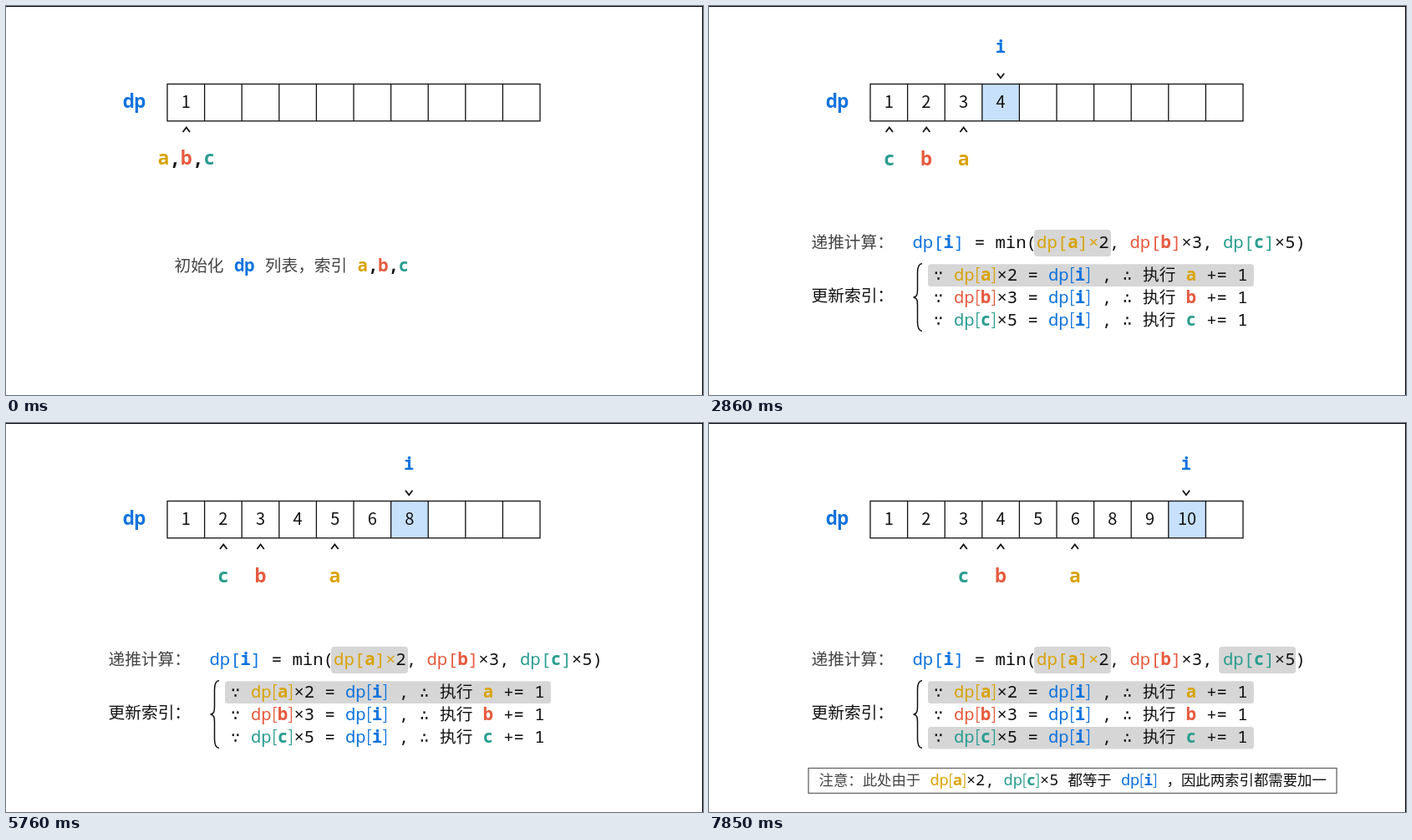
Animation of 834x466 px, one loop 8000 ms. Source, as an HTML page:

```html
<!DOCTYPE html>
<html lang="zh-CN">
<head>
<meta charset="utf-8">
<title>dp</title>
<style>
  html, body { margin: 0; width: 100%; height: 100%; overflow: hidden; background: #fff; }
  svg { display: block; width: 834px; height: 466px; }
  text { white-space: pre; font-family: "Noto Sans Mono", "DejaVu Sans Mono", monospace; fill: #111; }
  .cjk, .num { font-family: "Noto Sans CJK SC", "Noto Sans CJK", "Noto Sans", sans-serif; }
  .sym { font-family: "DejaVu Sans Mono", monospace; text-anchor: middle; }
  .mid { text-anchor: middle; }
  .bold { font-weight: 700; }
  .i { fill: #0f73dd; }
  .a { fill: #d9a306; }
  .b { fill: #e65a3e; }
  .c { fill: #2a9d8f; }
  .grey { fill: #444; }
  .mark { fill: #d6d6d6; }
  .line { fill: none; stroke: #111; stroke-width: 1.3; }
  .caret { fill: none; stroke: #111; stroke-width: 1.8; }
  .brace { fill: none; stroke: #111; stroke-width: 1.5; }
</style>
</head>
<body>
<svg viewBox="0 0 834 466" id="stage"></svg>
<script>
const DURATION = 8000;
const STARTS = [0, 810, 1770, 2780, 3740, 4750, 5760, 6770, 7730];
const FACTORS = { a: 2, b: 3, c: 5 };
const KEYS = ['a', 'b', 'c'];
const CELL = 44.6, LEFT = 193, TOP = 93.5, HEIGHT = 44.3, ROW = 27.1;
const TEXT = { mono: 20.5, cjk: 19.7, bracket: 7.3 };
const FORMULA = { mono: 20.64, cjk: 19.7, bracket: 12.38 };
const NOTE = { mono: 18.6, cjk: 17.4, bracket: 5 };
const LABEL = { mono: 22.9, cjk: 22.9, bracket: 13.7 };

const center = n => LEFT + CELL * (n + .5);
const pointer = n => 215.8 + 44.4 * n;
const rect = (x, y, w, h, attrs) =>
  `<rect x="${x}" y="${y}" width="${w}" height="${h}" ${attrs}/>`;
const text = (x, y, size, cls, s) =>
  `<text x="${x.toFixed(2)}" y="${y}" font-size="${size}" class="${cls}">${s}</text>`;
const ref = key => [['dp[', key], [key, key + ' bold'], [']', key]];

// Lays out [text, class] parts, mixing fixed-pitch, full-width and bracket advances.
function run(x, y, style, parts) {
  const advance = style.mono * .6;
  const kinds = /[\u3000-\u9fff\uff00-\uffef]+|[∵∴]|[\[\]]|[^\u3000-\u9fff\uff00-\uffef∵∴\[\]]+/g;
  let out = '';
  for (const [content, cls = ''] of parts) {
    for (const s of content.match(kinds)) {
      if (/[\u3000-\u9fff\uff00-\uffef]/.test(s)) {
        out += text(x, y, style.cjk, cls + ' cjk', s);
        x += s.length * style.cjk;
      } else if (/[∵∴]/.test(s)) {
        out += text(x + advance / 2, y, style.mono * .9, 'sym', s);
        x += advance;
      } else if (/[\[\]]/.test(s)) {
        const narrow = style.bracket < advance * .8;
        out += narrow
          ? text(x + style.bracket / 2, y, style.cjk, cls + ' cjk mid', s)
          : text(x, y, style.mono, cls, s);
        x += style.bracket;
      } else {
        out += text(x, y, style.mono, cls, s);
        x += s.length * advance;
      }
    }
  }
  return out;
}

const commaList = keys =>
  keys.flatMap((k, n) => n ? [[',', 'bold'], [k, k + ' bold']] : [[k, k + ' bold']]);

function caret(x, base, tip) {
  return `<path class="caret" d="M${x - 4.2} ${base}L${x} ${tip}L${x + 4.2} ${base}"/>`;
}

function board(dp, index, current) {
  let out = text(139.8, 122, 22.9, 'i bold', 'dp');
  if (current) {
    const x = pointer(current);
    out += rect(LEFT + CELL * current, TOP, CELL, HEIGHT, 'fill="#c7e0fc"');
    out += text(x, 55.5, 20.5, 'i bold mid', 'i') + caret(x, 80.7, 86.2);
  }
  out += rect(LEFT, TOP, CELL * 10, HEIGHT, 'class="line"');
  for (let n = 1; n < 10; n++) {
    out += `<path class="line" d="M${LEFT + CELL * n} ${TOP}v${HEIGHT}"/>`;
  }
  dp.forEach((v, n) => out += text(center(n), 122, 20, 'num mid', v));
  for (const n of new Set(Object.values(index))) {
    const keys = KEYS.filter(k => index[k] === n);
    const width = (keys.length * 2 - 1) * LABEL.mono * .6;
    out += caret(pointer(n), 151, 145.5);
    out += run(pointer(n) - width / 2, current ? 190.5 : 190, LABEL, commaList(keys));
  }
  return out;
}

function intro() {
  return run(201.5, 318, TEXT, [
    ['初始化', 'grey'], [' '], ['dp', 'i bold'], [' '], ['列表，索引', 'grey'], [' '],
    ...commaList(KEYS)
  ]);
}

function rules(hits) {
  let out = '';
  KEYS.forEach((k, n) => {
    if (!hits.includes(k)) return;
    out += rect(389 + 110.6 * n, 268, 92, 32, 'rx="4" class="mark"');
    out += rect(262, 309.3 + 27.3 * n, 390, 26.6, 'rx="3.5" class="mark"');
  });
  out += run(122.5, 290, TEXT, [['递推计算：', 'grey']]);
  out += run(122.6, 354, TEXT, [['更新索引：']]);
  out += run(243.4, 290, FORMULA, [
    ...ref('i'), [' = min('],
    ...ref('a'), ['×', 'a'], ['2, '],
    ...ref('b'), ['×3, '],
    ...ref('c'), ['×5)']
  ]);
  out += '<path class="brace" d="M255 308.5c-4.5 .5-5.5 5-5.5 11v20.5c0 6-1 8.5-5 9 4 .5 5 3 5 9v20.5c0 6 1 10.5 5.5 11"/>';
  KEYS.forEach((k, n) => {
    out += run(268.4, 329 + ROW * n, TEXT, [
      ['∵ '], ...ref(k), [`×${FACTORS[k]} = `], ...ref('i'),
      [' , ∴ 执行 '], [k, k + ' bold'], [' += 1']
    ]);
  });
  return out;
}

function note([p, q]) {
  return rect(119, 413.5, 632, 30, 'class="line" style="stroke:#666"') +
    run(131.5, 434, NOTE, [
      ['注意：此处由于', 'grey'], [' '], ...ref(p), [`×${FACTORS[p]}, `],
      ...ref(q), [`×${FACTORS[q]} 都等于 `], ...ref('i'), [' ，因此两索引都需要加一']
    ]);
}

function buildScenes() {
  const dp = [1], index = { a: 0, b: 0, c: 0 };
  const scenes = [board(dp, index, 0) + intro()];
  while (scenes.length < STARTS.length) {
    const product = k => dp[index[k]] * FACTORS[k];
    const next = Math.min(...KEYS.map(product));
    const hits = KEYS.filter(k => product(k) === next);
    hits.forEach(k => index[k]++);
    dp.push(next);
    scenes.push(board(dp, index, dp.length - 1) + rules(hits) +
      (hits.length > 1 ? note(hits) : ''));
  }
  return scenes;
}

const stage = document.getElementById('stage');
stage.innerHTML = buildScenes().map(s => `<g visibility="hidden">${s}</g>`).join('') +
  rect(0, 0, 834, 1, '') + rect(833, 0, 1, 466, '');
const groups = [...stage.querySelectorAll('g')];

function draw() {
  const t = performance.now() % DURATION;
  const active = STARTS.filter(s => s <= t).length - 1;
  groups.forEach((g, n) => g.setAttribute('visibility', n === active ? 'visible' : 'hidden'));
  requestAnimationFrame(draw);
}
draw();
</script>
</body>
</html>
```
